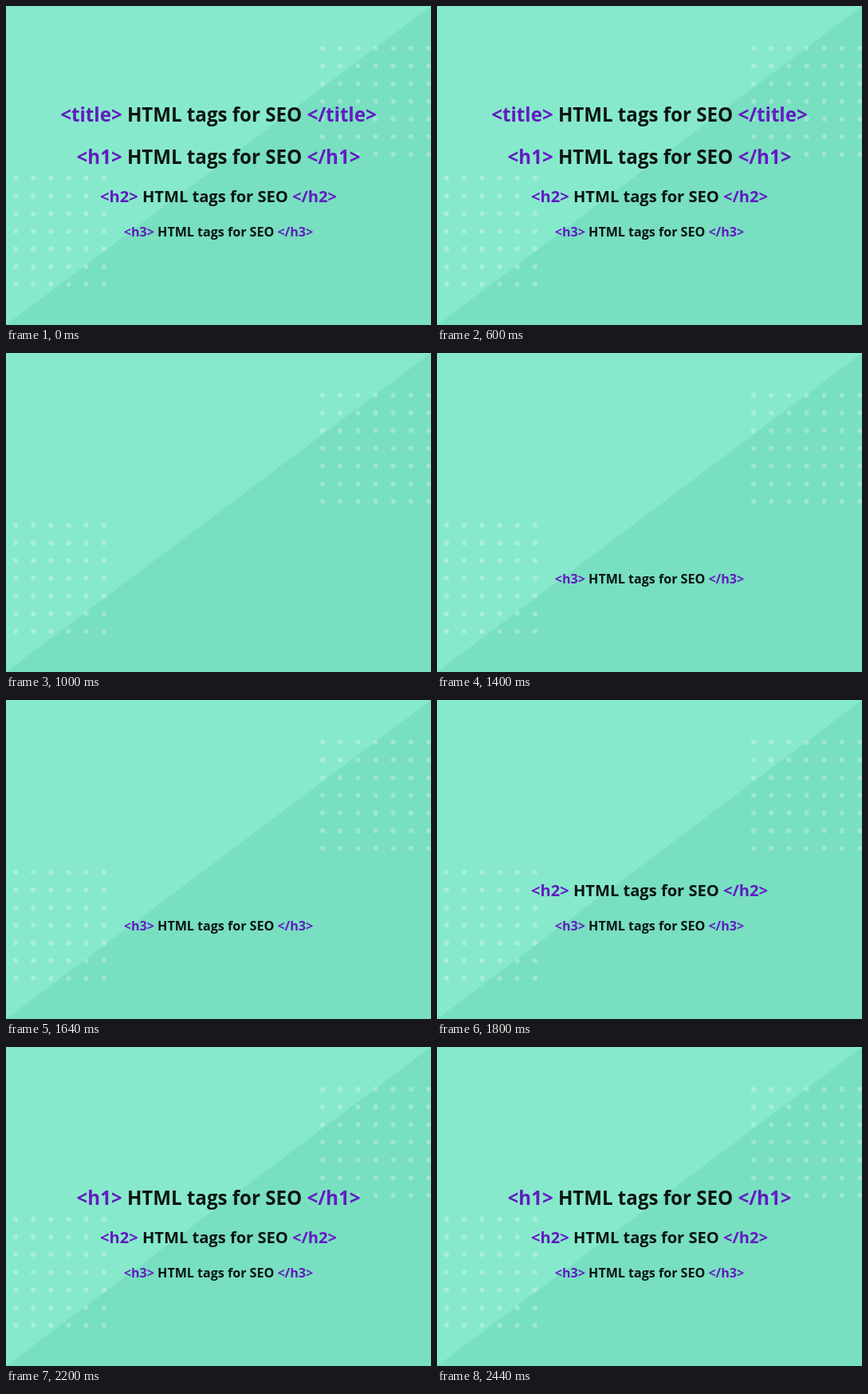
Animation of 533 by 400 pixels, one loop 2.6 s. Source, as an HTML page:

```html
<!DOCTYPE html>
<html lang="en">
<head>
<meta charset="utf-8">
<title>HTML tags for SEO</title>
<style>
  html, body { margin: 0; width: 100%; height: 100%; overflow: hidden; background: #78dfc1; }
  svg { display: block; width: 533px; height: 400px; }
  text {
    font-family: "Open Sans", "Noto Sans", sans-serif;
    font-weight: 700;
    fill: #0b1512;
    text-anchor: middle;
    white-space: pre;
  }
  .tag { fill: #611cc0; }
  .dots { fill: #fff; fill-opacity: .27; }
</style>
</head>
<body>
<svg viewBox="0 0 533 400">
  <path d="M0 0H533L0 400Z" fill="#87e9cc"/>
  <g class="dots" id="dots"></g>
  <g id="lines"></g>
</svg>
<script>
const NS = "http://www.w3.org/2000/svg";
const LOOP = 2600;
const HIDE = 1000; // all lines vanish together, then return from the bottom up

// tag, font size, baseline, time of return
const LINES = [
  ["title", 24.1, 145, 2600],
  ["h1", 24.1, 198, 2200],
  ["h2", 20.1, 246, 1800],
  ["h3", 16.07, 289, 1400]
];

function add(parent, name, attrs, content = "") {
  const el = document.createElementNS(NS, name);
  for (const key in attrs) el.setAttribute(key, attrs[key]);
  el.textContent = content;
  return parent.appendChild(el);
}

function dotGrid(left, top, cols, rows) {
  const pitch = 22.17;
  for (let row = 0; row < rows; row++)
    for (let col = 0; col < cols; col++)
      add(dots, "circle", { cx: left + col * pitch, cy: top + row * pitch, r: 3.1 });
}

function tagLine([tag, size, y, back]) {
  const el = add(lines, "text", { x: 266.5, y, "font-size": size });
  add(el, "tspan", { class: "tag" }, `<${tag}>`);
  add(el, "tspan", {}, " HTML tags for SEO ");
  add(el, "tspan", { class: "tag" }, `</${tag}>`);
  return { el, back };
}

const dots = document.getElementById("dots");
const lines = document.getElementById("lines");
dotGrid(397, 53, 7, 7);
dotGrid(12, 216, 6, 7);
const rows = LINES.map(tagLine);

const start = performance.now();
function draw(now) {
  const t = Math.max(0, now - start) % LOOP;
  for (const { el, back } of rows)
    el.style.visibility = t < HIDE || t >= back ? "visible" : "hidden";
  requestAnimationFrame(draw);
}
draw(start);
</script>
</body>
</html>
```
